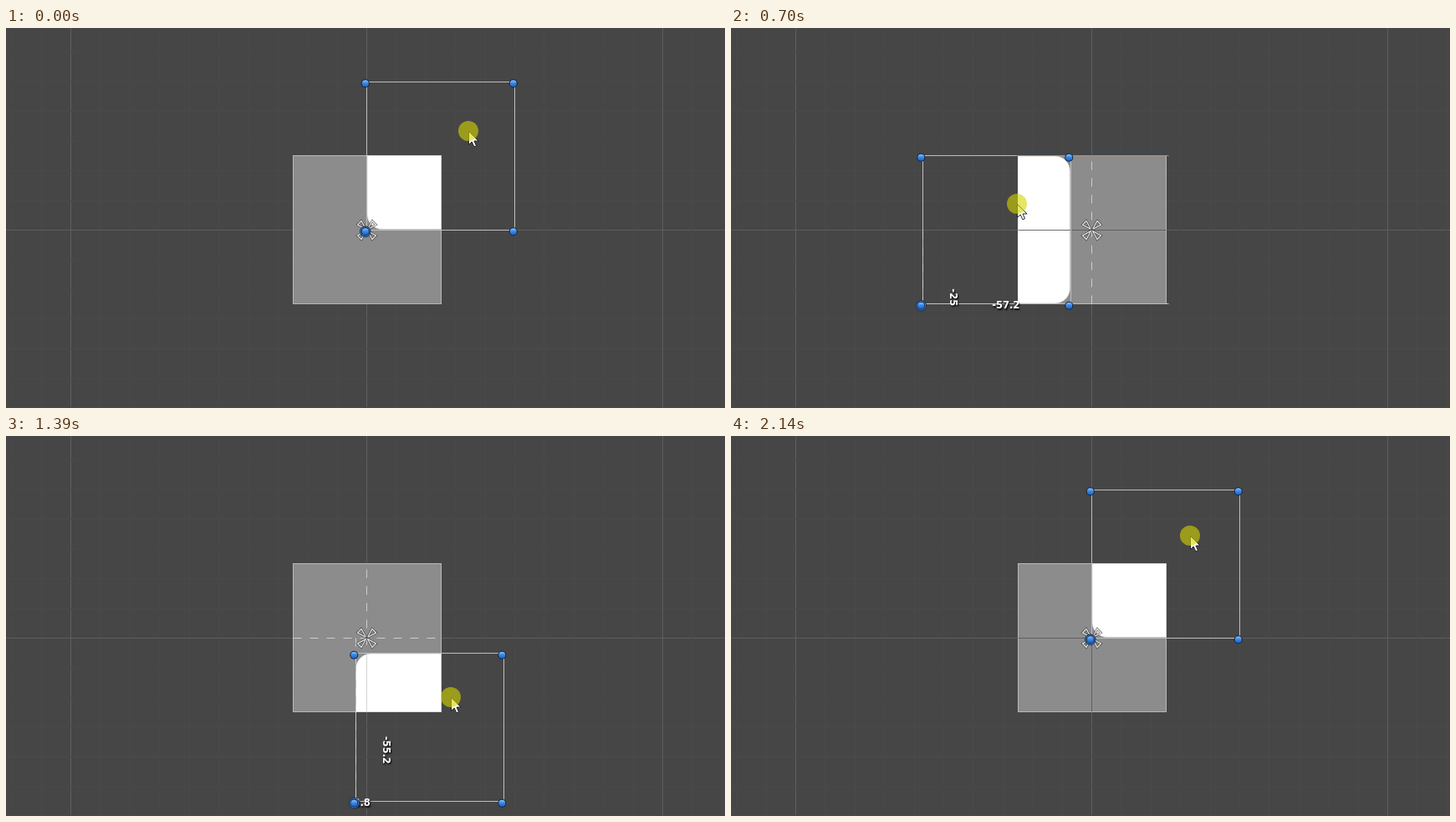
An HTML page with a canvas that plays this animation: 860 px wide and 454 px high, repeating every 2.17 s.

```html
<!DOCTYPE html>
<html lang="en">
<head>
<meta charset="utf-8">
<title>Dragging a masked rectangle</title>
<style>
html, body { margin: 0; width: 100%; height: 100%; overflow: hidden; background: #464646; }
canvas { display: block; }
</style>
</head>
<body>
<canvas id="stage" width="860" height="454"></canvas>
<script>
const ctx = document.getElementById('stage').getContext('2d');
const LOOP = 2170, STEP = 46.5;
const CX = 431.5, CY = 241.5, SIZE = 177, UNIT = 3.54;
const L = CX - SIZE / 2, T = CY - SIZE / 2;

// step, rectangle left and top, pointer x and y
const keys = [
  [0, 431.5, 64.5, 553, 123],
  [4, 388, 54, 500, 106],
  [7, 343, 64.5, 453, 114],
  [12, 265, 94, 379, 146],
  [15, 229, 153, 342, 210],
  [17, 224, 197, 338, 249],
  [20, 246, 262, 360, 314],
  [24, 305, 293, 419, 345],
  [26, 347.5, 286.1, 470, 335],
  [30, 418, 260, 532, 312],
  [34, 465.5, 208.9, 579, 261],
  [35, 467, 194, 581, 246],
  [40, 459.5, 108.75, 573, 161],
  [43, 447, 78, 561, 130],
  [46, 431.5, 64.5, 549, 119]
];

const px = x => Math.floor(x) + 0.5;
const py = y => Math.ceil(y) - 0.5;
const snap = (v, goal) => Math.abs(v - goal) < 3.5 ? goal : v;

function pose(step) {
  const i = Math.max(1, keys.findIndex(k => k[0] >= step));
  const a = keys[i - 1], b = keys[i];
  const f = (step - a[0]) / (b[0] - a[0]);
  return a.map((v, n) => v + (b[n] - v) * f).slice(1);
}

function line(x1, y1, x2, y2, color, dash = []) {
  ctx.strokeStyle = color;
  ctx.lineWidth = 1;
  ctx.setLineDash(dash);
  ctx.beginPath();
  ctx.moveTo(px(x1), py(y1));
  ctx.lineTo(px(x2), py(y2));
  ctx.stroke();
  ctx.setLineDash([]);
}

function frame(x, y, color) {
  ctx.strokeStyle = color;
  ctx.lineWidth = 1;
  ctx.strokeRect(px(x), py(y), SIZE, SIZE);
}

function disc(x, y, r, fill) {
  ctx.fillStyle = fill;
  ctx.beginPath();
  ctx.arc(x, y, r, 0, 7);
  ctx.fill();
}

function grid() {
  ctx.fillStyle = '#464646';
  ctx.fillRect(0, 0, 860, 454);
  for (let n = -13; n <= 13; n++) {
    const d = n * 35.4;
    line(CX + d, 0, CX + d, 454, n % 10 ? '#494949' : '#5e5e5e');
    line(0, CY + d, 860, CY + d, n % 10 ? '#494949' : '#5e5e5e');
  }
}

function sprite(x, y) {
  ctx.save();
  ctx.beginPath();
  ctx.rect(L, T - 0.5, SIZE + 0.5, SIZE);
  ctx.clip();
  ctx.beginPath();
  ctx.roundRect(x + 0.5, y, SIZE - 1, SIZE - 1, 18);
  ctx.fillStyle = '#fff';
  ctx.fill();
  ctx.strokeStyle = 'rgba(190,190,190,.6)';
  ctx.lineWidth = 1;
  ctx.stroke();
  ctx.clip();
  return () => ctx.restore();
}

function axes(step) {
  if (step === 0) return;
  const late = step >= 43;
  const light = 'rgba(215,215,215,.85)', dark = 'rgba(80,80,80,.75)';
  if (late || step <= 15) line(L, CY, L + SIZE, CY, dark);
  else line(L, CY, L + SIZE, CY, light, [10, 10]);
  if (late || step <= 13) line(CX, T, CX, T + SIZE, dark);
  else line(CX, T + 7, CX, T + SIZE, light, [10, 10]);
}

function anchor() {
  for (const [sx, sy] of [[-1, -1], [1, -1], [1, 1], [-1, 1]]) {
    ctx.beginPath();
    ctx.moveTo(CX + sx, CY + sy);
    ctx.lineTo(CX + sx * 11, CY + sy * 6.5);
    ctx.lineTo(CX + sx * 6.5, CY + sy * 11);
    ctx.closePath();
    ctx.strokeStyle = 'rgba(45,45,45,.65)';
    ctx.lineWidth = 2.6;
    ctx.stroke();
    ctx.strokeStyle = '#eee';
    ctx.lineWidth = 1.1;
    ctx.stroke();
  }
}

function handle(x, y, pivot) {
  if (pivot) {
    disc(x, y, 6.7, '#172e50');
    disc(x, y, 5.7, '#4a91dc');
  }
  disc(x, y, 5, '#12233e');
  const shine = ctx.createLinearGradient(0, y - 4, 0, y + 4);
  shine.addColorStop(0, '#8cc4ff');
  shine.addColorStop(0.5, '#3485e6');
  shine.addColorStop(1, '#1e62c4');
  disc(x, y, 4, shine);
}

function label(value, x, y, turn) {
  const n = +value.toFixed(1);
  if (!n) return;
  ctx.save();
  ctx.translate(x, y);
  ctx.rotate(turn);
  ctx.font = 'bold 11.5px "DejaVu Sans", sans-serif';
  ctx.textAlign = 'center';
  ctx.textBaseline = 'middle';
  ctx.shadowColor = '#000';
  ctx.shadowBlur = 2;
  ctx.shadowOffsetX = 1;
  ctx.shadowOffsetY = 1.5;
  ctx.fillStyle = '#fff';
  ctx.fillText(n, 0, 0.5);
  ctx.restore();
}

function pointer(x, y) {
  ctx.save();
  ctx.translate(x + 0.5, y + 0.5);
  ctx.beginPath();
  [[0, 0], [0, 16], [3.7, 12.5], [6.3, 18.3], [9, 17.2], [6.5, 11.5], [11.6, 11.5]]
    .forEach(p => ctx.lineTo(...p));
  ctx.closePath();
  ctx.fillStyle = '#fff';
  ctx.fill();
  ctx.strokeStyle = '#222';
  ctx.lineWidth = 1;
  ctx.stroke();
  ctx.restore();
  disc(x, y, 12, 'rgba(212,212,0,.6)');
}

function draw(ms) {
  const step = Math.floor((ms % LOOP + 12) / STEP);
  let [x, y, mx, my] = pose(step);
  x = snap(x, L);
  y = snap(y, T);
  const right = x + SIZE, bottom = y + SIZE;

  grid();
  ctx.fillStyle = '#8c8c8c';
  ctx.fillRect(L, T - 0.5, SIZE + 0.5, SIZE);
  frame(L, T, '#b9b9b9');

  const unclip = sprite(x, y);
  if (step) {
    line(L, CY, L + SIZE, CY, '#c4c4c4');
    line(CX, T, CX, T + SIZE, '#d4d4d4');
  }
  unclip();

  axes(step);
  frame(x, y, '#bebebe');
  if (step) {
    line(CX, bottom, x, bottom, '#c4c4c4');
    line(x, CY, x, bottom, '#d0d0d0', [10, 10]);
  }
  if (x === L) {
    line(x, T - 3, x, T + SIZE + 3, '#c0c0c0');
    line(right, T - 3, right, T + SIZE + 3, '#e8862a');
  }
  if (y === T) {
    line(L - 2, bottom, L + SIZE + 3, bottom, '#c0c0c0');
    line(L - 2, y, L + SIZE + 3, y, '#e8862a');
  }
  anchor();

  label((x - CX) / UNIT, (x + CX) / 2 - 1.5, bottom + 2, 0);
  label((CY - bottom) / UNIT, x + 36, (bottom + CY) / 2 + 36, Math.PI / 2);

  for (const hx of [x, right])
    for (const hy of [y, bottom])
      handle(hx - 1.7, hy + 1.7, hx === x && hy === bottom);
  pointer(mx, my);
}

const start = performance.now();
function tick() {
  draw(performance.now() - start);
  requestAnimationFrame(tick);
}
tick();
</script>
</body>
</html>
```
